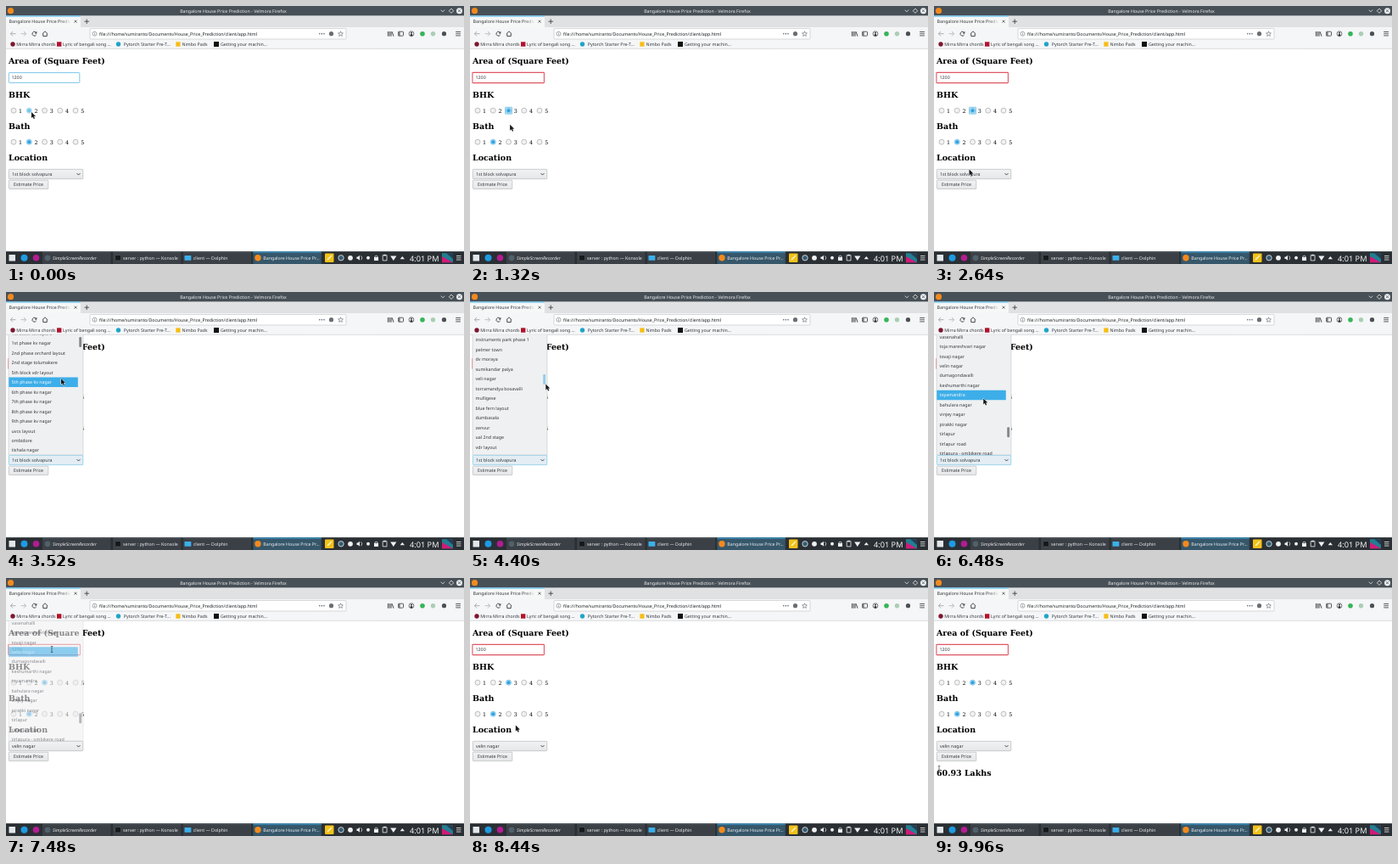
An HTML page with a canvas for the animation above (10 s loop, 540 by 304 pixels).

```html
<!DOCTYPE html>
<html lang="en">
<head>
<meta charset="utf-8">
<title>House price form</title>
<style>
html, body { margin: 0; width: 540px; height: 304px; overflow: hidden; background: #fff; }
canvas { display: block; }
</style>
</head>
<body>
<canvas id="stage" width="540" height="304"></canvas>
<script>
const c = document.getElementById('stage').getContext('2d');
const LOOP = 10000, STEP = 40;
const UI = '5.27px "Noto Sans", sans-serif';
const SERIF = '"DejaVu Serif", serif';
const BLUE = '#3daee9', INK = '#31363b', PALE = '#93cee9';
const ROW = 11.47, TOP = 50.5, BOTTOM = 192;
const CHOICE = 190;

// ---- place list ----
const known = {
  0: ['1st block solvapura', '1st phase kv nagar', '2nd phase orchard layout', '2nd stage tolumakere',
    '5th block vdr layout', '5th phase kv nagar', '6th phase kv nagar', '7th phase kv nagar',
    '8th phase kv nagar', '9th phase kv nagar', 'uvcs layout', 'ombidore', 'tishala nagar'],
  78: ['instruments park phase 1', 'pelmer town', 'dv moraya', 'sumikandar palya', 'veli nagar',
    'torramandya bosavalli', 'mulligese', 'blue fern layout', 'dumbasala', 'zenvur', 'ual 2nd stage', 'vdr layout'],
  180: ['tui layout', 'monavur', 'sirappina umbahara', 'mottandur umbahara', 'neela vigna layout',
    'drishvi layout', 'k.l. nagar', 'vasenahalli', 'toja mareshvari nagar', 'tovaji nagar', 'velin nagar',
    'dumagondavalli', 'keshumarthi nagar', 'toyamandra', 'bahulara nagar', 'vinjey nagar', 'pirakki nagar',
    'tirlapur', 'tirlapur road', 'tirlapura - ombikere road']
};
const parts = ['mu', 'vel', 'tor', 'isha', 'dun', 'oma', 'ril', 'zen', 'kov', 'sumi'];
const ends = [' nagar', 'ahalli', ' layout', 'apura', ' palya', 'andra'];
let seed = 7;
const pick = a => a[(seed = (seed * 16807) % 2147483647) % a.length];
const places = Array.from({ length: 215 }, () => pick(parts) + pick(parts) + pick(ends));
for (const at in known) known[at].forEach((name, i) => places[+at + i] = name);

// ---- motion ----
const mousePath = [
  [0, 30, 125], [440, 44, 122], [640, 46, 124], [800, 46, 124], [1760, 48, 152], [2000, 48, 152],
  [2640, 41.5, 192.5], [2920, 44, 196], [3080, 44, 192], [3520, 65, 102], [4000, 88.5, 65],
  [4400, 89.3, 108.5], [5040, 88.6, 164], [5120, 88.6, 164.5], [5400, 88.6, 169], [5960, 60, 142],
  [6120, 60, 142], [7120, 54, 86], [7280, 54, 86], [7480, 54, 84], [8280, 68, 150], [8320, 68, 150],
  [8600, 32, 210], [9320, 32, 210], [9520, 13, 218], [9720, 13, 218], [9960, 6, 225]
];
const thumbPath = [[4040, 53], [4400, 97], [5040, 154.4], [5120, 155.1], [5400, 159.2]];

function along(path, t, smooth) {
  if (t <= path[0][0]) return path[0].slice(1);
  for (let i = 1; i < path.length; i++) {
    const a = path[i - 1], b = path[i];
    if (t > b[0]) continue;
    let k = (t - a[0]) / (b[0] - a[0]);
    if (smooth) k = k * k * (3 - 2 * k);
    return a.slice(1).map((v, j) => v + (b[j + 1] - v) * k);
  }
  return path[path.length - 1].slice(1);
}
const clamp = v => Math.max(0, Math.min(1, v));

// ---- drawing helpers ----
function box(x, y, w, h, fill, line, r = 0, lw = 0.6) {
  c.beginPath();
  c.roundRect(x, y, w, h, r);
  if (fill) { c.fillStyle = fill; c.fill(); }
  if (line) { c.strokeStyle = line; c.lineWidth = lw; c.stroke(); }
}
function disc(x, y, r, fill, line, lw = 0.6) {
  c.beginPath();
  c.arc(x, y, r, 0, 7);
  if (fill) { c.fillStyle = fill; c.fill(); }
  if (line) { c.strokeStyle = line; c.lineWidth = lw; c.stroke(); }
}
function path(pts, line, lw = 0.8, fill) {
  c.beginPath();
  pts.forEach(([x, y], i) => i ? c.lineTo(x, y) : c.moveTo(x, y));
  if (fill) { c.closePath(); c.fillStyle = fill; c.fill(); }
  if (line) { c.strokeStyle = line; c.lineWidth = lw; c.stroke(); }
}
function text(s, x, y, color = INK, font = UI, align = 'left') {
  c.font = font;
  c.textAlign = align;
  c.fillStyle = color;
  c.fillText(s, x, y);
}
const chevron = (x, y, w, color, lw, d = 1) =>
  path([[x - w, y - w * d / 2], [x, y + w * d / 2], [x + w, y - w * d / 2]], color, lw);
const cross = (x, y, r, color, lw) => {
  path([[x - r, y - r], [x + r, y + r]], color, lw);
  path([[x - r, y + r], [x + r, y - r]], color, lw);
};
const title = (s, y) => text(s, 3, y, '#000', 'bold 9.487px ' + SERIF);

// ---- browser window ----
function titleBar() {
  box(0, 0, 540, 11.5, '#475057');
  disc(5.5, 5.7, 3.6, '#f28a1e');
  text('Bangalore House Price Prediction - Velmora Firefox', 268, 7.7, '#eff0f1', UI, 'center');
  chevron(515, 5.7, 2.2, '#eff0f1', 0.8);
  path([[525, 3], [527.7, 5.7], [525, 8.4], [522.3, 5.7], [525, 3]], '#eff0f1', 0.8);
  disc(534.5, 5.7, 3.5, '#eff0f1');
  cross(534.5, 5.7, 1.5, '#475057', 0.8);
}

function tabs() {
  box(0, 11.5, 540, 13.5, '#dfe1e3');
  box(0, 11.5, 88, 13.5, '#f6f7f7');
  box(0, 11.5, 88, 0.9, BLUE);
  const fade = c.createLinearGradient(64, 0, 77, 0);
  fade.addColorStop(0, INK);
  fade.addColorStop(1, 'rgba(49,54,59,0)');
  c.save();
  c.beginPath(); c.rect(0, 11, 77, 14); c.clip();
  text('Bangalore House Price Prediction', 3.5, 20.2, fade);
  c.restore();
  cross(82, 18.2, 1.5, INK, 0.7);
  path([[92.5, 18.2], [98, 18.2]], INK, 0.8);
  path([[95.2, 15.5], [95.2, 21]], INK, 0.8);
}

function toolbar() {
  box(0, 25, 540, 25.5, '#f5f6f7');
  path([[0, 50.3], [540, 50.3]], '#ccced0', 0.6);
  path([[11.5, 32.7], [5.5, 32.7]], '#a3a6a8', 0.9);
  path([[8, 30], [5.3, 32.7], [8, 35.4]], '#a3a6a8', 0.9);
  path([[17.5, 32.7], [23.5, 32.7]], '#b6b8ba', 0.9);
  path([[21, 30], [23.7, 32.7], [21, 35.4]], '#b6b8ba', 0.9);
  c.beginPath(); c.arc(33.5, 32.7, 2.5, 0.5, 5.5);
  c.strokeStyle = INK; c.lineWidth = 0.9; c.stroke();
  path([[36.3, 29.7], [36.3, 32.4], [33.6, 32.4]], null, 0, INK);
  path([[42.8, 32.9], [46, 29.8], [49.2, 32.9]], INK, 0.9);
  path([[43.8, 32.6], [43.8, 35.6], [48.2, 35.6], [48.2, 32.6]], INK, 0.9);

  box(99, 26.5, 302, 12.5, '#fff', '#bfc2c5', 1);
  disc(104.5, 32.7, 2.5, null, '#6a6e72', 0.6);
  path([[104.5, 32.2], [104.5, 34.2]], '#6a6e72', 0.7);
  disc(104.5, 31.2, 0.4, '#6a6e72');
  text('file:///home/sumiranto/Documents/House_Price_Prediction/client/app.html', 110, 34.6, '#1b1e20');
  [369.8, 372.4, 375].forEach(x => disc(x, 32.7, 0.8, '#55595d'));
  disc(383.5, 32.7, 2.6, '#6a6e72');
  const star = Array.from({ length: 11 }, (_, i) => {
    const a = -Math.PI / 2 + i * Math.PI / 5, r = i % 2 ? 1.4 : 3.1;
    return [394.5 + r * Math.cos(a), 32.9 + r * Math.sin(a)];
  });
  path(star, '#55595d', 0.6);

  [450.5, 452.3, 454.1].forEach(x => path([[x, 30], [x, 35.7]], INK, 0.9));
  path([[455.2, 30.3], [457, 35.7]], INK, 0.9);
  box(462.5, 30.2, 6, 5, null, INK, 0.8, 0.8);
  box(462.5, 30.2, 2.2, 5, '#777b7f');
  disc(478, 32.7, 2.9, null, INK, 0.7);
  disc(478, 31.8, 1, INK);
  disc(478, 34.2, 1.3, INK);
  disc(491, 32.7, 2.8, '#35b558');
  disc(503.5, 32.7, 2.7, '#a9cfb5');
  disc(516.5, 32.7, 2.6, '#4b5055');
  [30.5, 32.7, 34.9].forEach(y => path([[530.2, y], [536, y]], INK, 0.8));

  disc(8, 45, 2.7, '#7d1730');
  box(60, 42.3, 5.4, 5.4, '#b3122d');
  disc(132.5, 45, 2.7, '#20a4c9');
  box(200.3, 42.3, 5.2, 5.4, '#f8bd16');
  box(245, 42, 6, 6, '#111');
  text('Mirra Mirra chords', 12.3, 46.9);
  text('Lyric of bengali song ...', 67, 46.9);
  text('Pytorch Starter Pre-T...', 138.8, 46.9);
  text('Nimbo Pads', 207.5, 46.9);
  text('Getting your machin...', 253, 46.9);
}

// ---- desktop panel ----
function task(x, label, active, font = UI) {
  box(x, 290, 80.5, 14, active ? '#36566a' : '#3a4046');
  box(x, 289.6, 80.5, 0.8, active ? BLUE : '#555c62');
  text(label, x + 12, 298.8, '#eff0f1', font);
}

function panel() {
  box(0, 289.3, 540, 15, '#2a2f34');
  box(3.5, 293, 7.5, 7.5, '#e4e7e9');
  disc(21.5, 296.8, 4, '#1e9be2');
  disc(35.5, 296.8, 3.8, '#b31c92');
  task(43, 'SimpleScreenRecorder', false, 'italic ' + UI);
  task(126, 'server : python — Konsole', false);
  task(208.7, 'client — Dolphin', false);
  task(291.3, 'Bangalore House Price Pr...', true);
  disc(49, 296.8, 3.4, '#52606b');
  box(128.5, 293.5, 7, 6.6, '#171a1d', '#596066', 0.5);
  box(210.5, 294, 7.8, 5.8, BLUE, null, 0.6);
  disc(297, 296.8, 3.7, '#f28a1e');

  const w = '#eff0f1';
  box(376, 291.5, 10.5, 10.5, '#f2c21a', null, 1);
  path([[379, 299], [384, 294]], '#fff6d4', 1.2);
  disc(395, 296.8, 3.2, '#345c73', w, 0.8);
  disc(406, 296.8, 2.9, w);
  path([[413.5, 295.6], [415, 295.6], [417, 293.8], [417, 299.8], [415, 298], [413.5, 298]], null, 0, w);
  c.beginPath(); c.arc(416.6, 296.8, 3, -0.9, 0.9); c.strokeStyle = w; c.lineWidth = 0.8; c.stroke();
  disc(427, 296.8, 2, w);
  box(434, 296, 5, 4, w);
  c.beginPath(); c.arc(436.5, 296, 1.7, Math.PI, 0); c.stroke();
  box(444.2, 293.7, 4.8, 6.2, null, w, 0, 0.8);
  box(445.4, 292.8, 2.4, 1.6, w);
  path([[453.2, 294.6], [460.4, 294.6], [456.8, 300]], null, 0, w);
  path([[464.6, 298.2], [470, 298.2], [467.3, 295]], null, 0, w);
  text('4:01 PM', 476, 300.9, '#f5f6f7', '9.2px "Noto Sans", sans-serif');
  box(514, 291.2, 13, 11, '#227f92');
  path([[514, 295], [527, 302.2], [514, 302.2]], null, 0, '#d11a78');
  path([[519, 291.2], [527, 291.2], [527, 298]], null, 0, '#263d55');
  [294.5, 296.8, 299.1].forEach(y => path([[531, y], [536.5, y]], w, 0.8));
}

// ---- page ----
function radios(y, chosen, s, live) {
  for (let i = 0; i < 5; i++) {
    const x = 9 + i * 18.25, on = i + 1 === chosen;
    const near = live && Math.hypot(s.mx - x, s.my - y) < 4.2;
    if (live && s.focus && on) box(x - 4, y - 4, 8, 8, '#c4e5f6', '#6bbde6', 0.3, 0.7);
    disc(x, y, 3, on ? '#b3def4' : '#f1f2f2', on || near ? (near ? PALE : '#58b5e5') : '#a5a8aa', 0.7);
    if (on) disc(x, y, 1.9, near ? '#6fc3ec' : '#2c9fdc');
    text(i + 1, 15.1 + i * 18.3, y + 3, '#000', '6.325px ' + SERIF);
  }
}

function button(x, y, w, h, hot, tint) {
  const g = c.createLinearGradient(0, y, 0, y + h);
  g.addColorStop(0, tint || '#f1f2f3');
  g.addColorStop(1, tint || '#e6e7e8');
  box(x, y, w, h, g, hot ? '#7fc4e6' : '#b7babc', 0.8, 0.7);
}

function page(s) {
  box(0, 50.5, 540, 239, '#fff');
  title('Area of (Square Feet)', 67.5);
  title('BHK', 107.5);
  title('Bath', 144.8);
  title('Location', 181.6);
  if (s.touched) box(2.9, 78.4, 84.5, 12.2, '#fff', '#df5663', 0.6, 1.1);
  else box(3.3, 78.6, 83.5, 11.8, '#fff', '#6fc0e6', 0.8, 0.9);
  text('1200', 6.6, 86.4);
  radios(123.2, s.bhk, s, true);
  radios(160.2, 2, s, false);

  const overPick = s.mx > 3 && s.mx < 91 && s.my > 192.5 && s.my < 204;
  button(3.3, 192.4, 87.5, 11.3, s.open || overPick, s.open ? '#e3edf3' : null);
  text(places[s.chosen], 7, 200.1);
  chevron(85.5, 198.1, 1.9, INK, 0.9);
  const overBtn = s.my > 205 && s.my < 215.5 && s.mx > 3 && s.mx < 50;
  button(3.3, 205.2, 46.5, 10.4, overBtn && s.t > 8000, s.pressed ? '#c9dfeb' : null);
  text('Estimate Price', 9, 212.4);
  if (s.priced) title('60.93 Lakhs', 232.6);
}

function popup(s) {
  if (!s.alpha) return;
  const scroll = (s.thumb - 53) / 0.0496;
  c.save();
  c.globalAlpha = s.alpha;
  c.beginPath(); c.rect(2, TOP, 90, BOTTOM - TOP); c.clip();
  box(3, TOP - 2, 88, BOTTOM - TOP + 2, '#eff0f1', '#c3c6c8', 0, 0.6);
  const first = Math.max(0, Math.floor(scroll / ROW) - 1);
  for (let i = first; i < first + 16 && i < places.length; i++) {
    const y = 48.9 + ROW * i - scroll;
    const hot = !s.drag && s.mx < 85 && s.my < BOTTOM && Math.abs(s.my - y) <= ROW / 2;
    if (hot) box(3.3, y - ROW / 2, 81.5, ROW, BLUE);
    text(places[i], 6.6, y + 1.9, hot ? '#fcfcfc' : INK);
  }
  box(86.2, s.thumb, 2.9, 12, s.drag ? PALE : '#85898c', null, 1.2);
  c.restore();
}

function pointer(s) {
  const { mx: x, my: y, t } = s;
  const overField = !s.open && x > 3 && x < 87 && y > 78 && y < 91;
  if (overField || t > 9800) {
    path([[x, y - 3.5], [x, y + 3.5]], INK, 0.7);
    path([[x - 1.3, y - 3.5], [x + 1.3, y - 3.5]], INK, 0.6);
    path([[x - 1.3, y + 3.5], [x + 1.3, y + 3.5]], INK, 0.6);
    return;
  }
  const shape = [[0, 0], [0, 7], [1.6, 5.6], [2.8, 8.1], [4, 7.5], [2.9, 5.1], [5, 4.9], [0, 0]]
    .map(([a, b]) => [x + a, y + b]);
  path(shape, '#f5f5f5', 1);
  path(shape, null, 0, '#16191b');
}

function draw(t) {
  const [mx, my] = along(mousePath, t, t < 4000 || t > 5400);
  const open = t >= 2960 && t < 7440;
  const s = {
    t, mx, my, open,
    touched: t >= 480,
    bhk: t >= 480 ? 3 : 2,
    focus: t >= 480 && t < 2960,
    alpha: t < 7440 ? clamp((t - 2960) / 120) : clamp((7520 - t) / 70),
    thumb: along(thumbPath, t)[0],
    drag: t >= 4000 && t < 5440,
    chosen: t >= 7440 ? CHOICE : 0,
    pressed: t >= 8800 && t < 8920,
    priced: t >= 8920
  };
  c.textRendering = 'geometricPrecision';
  page(s);
  titleBar();
  tabs();
  toolbar();
  panel();
  popup(s);
  pointer(s);
}

const start = performance.now();
function tick() {
  const t = (performance.now() - start) % LOOP;
  draw(Math.floor(t / STEP) * STEP);
  requestAnimationFrame(tick);
}
tick();
</script>
</body>
</html>
```
